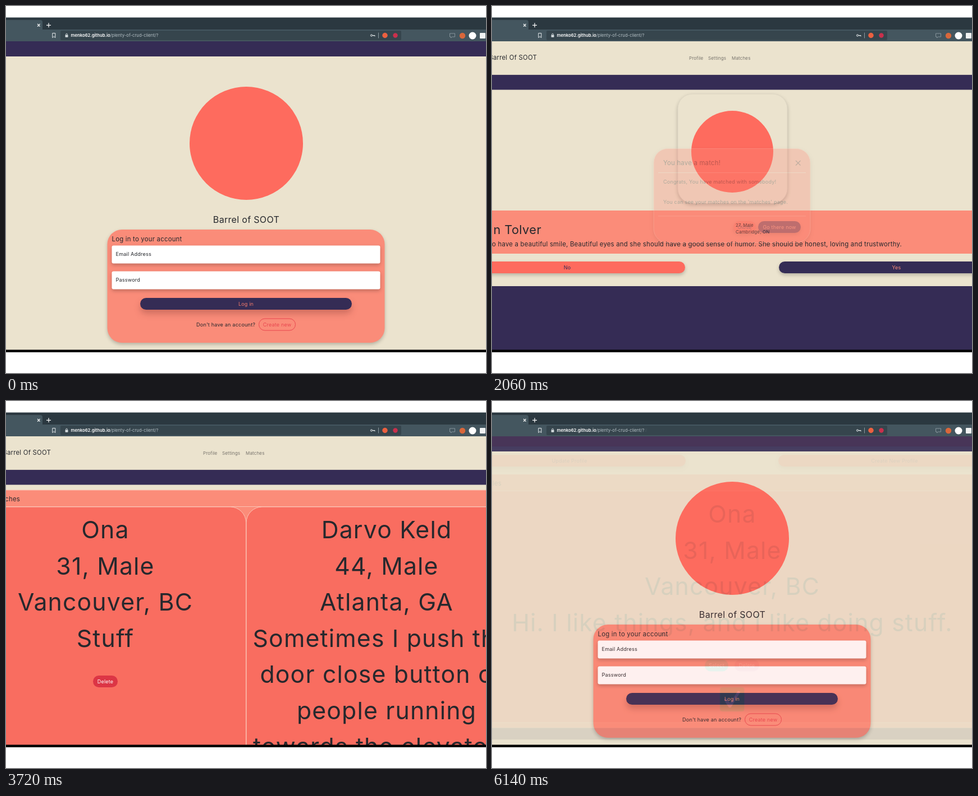
An HTML page for the animation above (6200 ms loop, 855 by 655 pixels).

```html
<!DOCTYPE html>
<html lang="en">
<head>
<meta charset="utf-8">
<title>Dating app walkthrough</title>
<style>
html, body { margin: 0; width: 100%; height: 100%; overflow: hidden; background: #fff; }
svg { display: block; width: 100vw; height: 100vh; }
text { font-family: Inter, "Open Sans", sans-serif; font-optical-sizing: none; letter-spacing: .02em; white-space: pre; }
.url { letter-spacing: 0; }
.big { letter-spacing: .028em; }
.shadow { filter: drop-shadow(0 3px 3px rgba(0, 0, 0, .22)); }
</style>
</head>
<body>
<svg id="stage" viewBox="0 0 855 655" xmlns="http://www.w3.org/2000/svg"></svg>
<script>
const CREAM = '#ebe3ce', PURPLE = '#352c55', CORAL = '#fe6b5e', SALMON = '#fb8c79',
      CARD = '#f96d60', INK = '#26282d', RED = '#dc3545', PALE = '#fbc3b4', URLBAR = '#36454d';
const LOOP = 6200, HOLD = 700, CYCLE = 1240, STEP = 60, STEPS = 10;

const box = (x, y, w, h, fill, r = 0, extra = '') =>
  `<rect x="${x}" y="${y}" width="${w}" height="${h}" rx="${r}" fill="${fill}" ${extra}/>`;
const dot = (x, y, r, fill) => `<circle cx="${x}" cy="${y}" r="${r}" fill="${fill}"/>`;
const path = (d, stroke, width = 1) =>
  `<path d="${d}" fill="none" stroke="${stroke}" stroke-width="${width}"/>`;
const label = (x, y, size, text, anchor = 'start', fill = INK, extra = '') =>
  `<text x="${x}" y="${y}" font-size="${size}" text-anchor="${anchor}" fill="${fill}" ${extra}>${text}</text>`;
const shadow = 'class="shadow"';

const pill = (x, y, w, fill, text, color, extra = shadow) =>
  box(x, y, w, 21, fill, 10.5, extra) + label(x + w / 2, y + 13.6, 9, text, 'middle', color);

// Large profile lines, one every 64.5 px.
const bigLines = (x, y, lines, anchor = 'middle') =>
  lines.map((line, i) => label(x, y + i * 64.5, 42.7, line, anchor, INK, 'class="big"')).join('');

function browser() {
  return box(0, 20.5, 855, 22, '#2b3840') +
    box(0, 42, 855, 21.5, '#44565f') +
    box(-6, 25, 71, 20, '#44565f', 4) +
    box(97, 44, 607, 17, URLBAR, 2) +
    path('M56 32l4.5 4.5M60.5 32l-4.5 4.5M72 34.3h8M76 30.3v8', '#fff', 1.2) +
    path('M82.8 48.5h5v8l-2.5-2-2.5 2z', '#e8ecee') +
    box(105.5, 51.5, 5, 4.2, '#d3dadd', .6) +
    path('M106.6 52v-1.4a1.4 1.4 0 0 1 2.8 0V52', '#d3dadd', .9) +
    `<text class="url" x="271.5" y="55.2" font-size="7.7" text-anchor="end" fill="#b4bfc4"><tspan fill="#fff" font-weight="600">menko62.github.io</tspan>/plenty-of-crud-client/?</text>` +
    `<circle cx="651" cy="52.5" r="1.6" fill="none" stroke="#e8ecee"/>` +
    path('M652.6 52.5h4.4v1.8M655 52.5v1.4', '#e8ecee') +
    path('M663.5 47.5v10', '#98a5ab', .9) +
    dot(675, 52.5, 4.7, '#ec6040') + dot(693.5, 52.5, 4.2, '#c9304c') +
    path('M790.5 49h9v6h-5l-2 2v-2h-2z', '#85939a') +
    dot(813, 53, 5.2, '#d9673b') + dot(831, 53, 6.5, '#fff') +
    box(844, 48, 10, 10, '#f0f2f2', 1);
}

// The address bar's tail belongs to the page, so it fades along with it.
const page = (content, hash = '') =>
  box(272, 46, 10, 13, URLBAR) +
  label(271.8, 55.2, 7.7, hash, 'start', '#b4bfc4', 'class="url"') +
  box(0, 63, 855, 551, CREAM) + content;

function login() {
  const field = (y, text) => box(188.5, y, 478, 32, '#fff', 3, shadow) + label(195.5, y + 18.7, 9.1, text);
  return page(
    box(0, 63, 855, 27, PURPLE) +
    dot(428, 245, 101, CORAL) +
    label(428, 387, 16, 'Barrel of SOOT', 'middle') +
    box(180.5, 399, 494, 202, '#fa8c79', 26, shadow) +
    label(188.5, 419.7, 11.35, 'Log in to your account') +
    field(427.5, 'Email Address') + field(473.5, 'Password') +
    pill(239, 521, 377, PURPLE, 'Log in', '#f47b6b', 'style="filter:drop-shadow(0 7px 6px rgba(80,20,20,.25))"') +
    label(339, 571.5, 9.1, "Don't have an account?") +
    pill(450.5, 558, 65, 'none', 'Create new', '#e9474f', 'stroke="#e9474f"'));
}

const header = () =>
  label(80, 96, 11.35, 'Barrel Of SOOT', 'end') +
  label(351, 95.8, 8, 'Profile', 'start', '#77736c') +
  label(385, 95.8, 8, 'Settings', 'start', '#77736c') +
  label(427, 95.8, 8, 'Matches', 'start', '#77736c') +
  path('M0 122.5H855', '#d3ccbb') +
  box(0, 123, 855, 26.5, PURPLE);

const candidate = () =>
  header() +
  box(331, 157, 195, 195, CREAM, 26, `${shadow} stroke="#ddd5c3"`) +
  dot(428, 260, 73, CORAL) +
  box(0, 365, 855, 77, SALMON) +
  label(88, 407, 21.7, 'n Tolver', 'end') +
  label(434, 394, 7.8, '27, Male') +
  label(434, 405.7, 8, 'Cambridge, ON') +
  label(730, 429.3, 11.35, 'to have a beautiful smile, Beautiful eyes and she should have a good sense of humor. She should be honest, loving and trustworthy.', 'end') +
  pill(-76, 456, 420, CORAL, 'No', PURPLE) +
  pill(511, 456, 419, PURPLE, 'Yes', SALMON) +
  box(0, 500, 855, 114, PURPLE);

const dialog = () =>
  box(288, 254.5, 279, 168, '#fc8a79', 25, `${shadow} stroke="${PALE}"`) +
  label(305, 284.2, 11.35, 'You have a match!') +
  path('M541 276l8.5 8.5M549.5 276l-8.5 8.5', '#5a3136', 1.1) +
  path('M296 297.5H559M296 375H559', PALE) +
  label(305, 316.7, 9.05, 'Congrats, You have matched with somebody!') +
  label(305, 352.7, 9.05, "You can see your matches on the 'matches' page.") +
  pill(430, 384, 40, CORAL, 'Close', PURPLE) +
  pill(474, 384, 76, PURPLE, 'Go there now', '#f5a091');

function matches() {
  const card = (x, w) => box(x, 189, w, 480, CARD, 28, `stroke="${PALE}"`);
  return page(
    header() +
    box(0, 159, 855, 455, SALMON) +
    path('M0 159H855M0 188.5H855', PALE) +
    label(25, 179.2, 11.35, 'Matches', 'end') +
    card(-74, 501.5) + card(428, 501) +
    bigLines(177, 245, ['Ona', '31, Male', 'Vancouver, BC', 'Stuff']) +
    pill(155, 490, 44, RED, 'Delete', '#fff', '') +
    bigLines(678, 245, ['Darvo Keld', '44, Male', 'Atlanta, GA']) +
    bigLines(439.5, 438.5, ['Sometimes I push the'], 'start') +
    bigLines(452.5, 503, ['door close button on'], 'start') +
    bigLines(678, 567.5, ['people running']) +
    bigLines(440, 632, ['towards the elevator'], 'start'));
}

const profiles = () => page(
  box(0, 63, 855, 18, SALMON) +
  path('M0 81.5H855', '#d8cfbd') +
  pill(-69, 96, 414, '#fe7365', 'Update Profile', '#4b3340') +
  pill(510, 96, 414, '#fe7365', 'Create New Profile', '#4b3340') +
  box(0, 131, 855, 452, SALMON) +
  label(17, 150.8, 11.35, 'Profiles', 'end') +
  box(-2, 160.5, 859, 413.5, CARD, 0, `stroke="${PALE}"`) +
  bigLines(428, 217, ['Ona', '31, Male', 'Vancouver, BC', 'Hi. I like things, and I like doing stuff.']) +
  pill(379, 461.5, 42, '#198754', 'Select', '#fff', '') +
  pill(432, 461.5, 44, RED, 'Delete', '#fff', '') +
  box(406, 511, 43.5, 43, '#10b92c', 4, 'stroke="#6fa56d"') +
  '<path d="M413 533l4.5-3 6.5 9 14-21.5 4.5 1.5-17 28h-3.5z" fill="#fff"/>' +
  box(0, 583.5, 855, 21, PURPLE) +
  box(0, 604.5, 855, 9.5, '#e2dbd3'), '#');

const screens = [login(), page(candidate()), page(candidate() + dialog()), matches(), profiles(), login()];

const stage = document.getElementById('stage');
stage.innerHTML =
  '<defs><clipPath id="window"><rect y="20" width="855" height="594"/></clipPath></defs>' +
  box(0, 0, 855, 655, '#fff') + browser() +
  `<g clip-path="url(#window)">${screens.map(s => `<g class="screen">${s}</g>`).join('')}</g>` +
  box(0, 613.5, 855, 4.5, '#000');
const layers = [...stage.querySelectorAll('.screen')];

// Each screen fades in over the one before it, in ten hard steps.
function render(time) {
  layers.forEach((layer, i) => {
    const elapsed = time - HOLD - (i - 1) * CYCLE;
    const level = Math.floor(elapsed / STEP) + 1;
    const opacity = i ? Math.min(1, Math.max(0, level / STEPS)) : 1;
    layer.setAttribute('opacity', opacity);
    layer.setAttribute('display', opacity ? 'inline' : 'none');
  });
}

const start = performance.now();
function tick() {
  render((performance.now() - start) % LOOP);
  requestAnimationFrame(tick);
}
tick();
</script>
</body>
</html>
```
